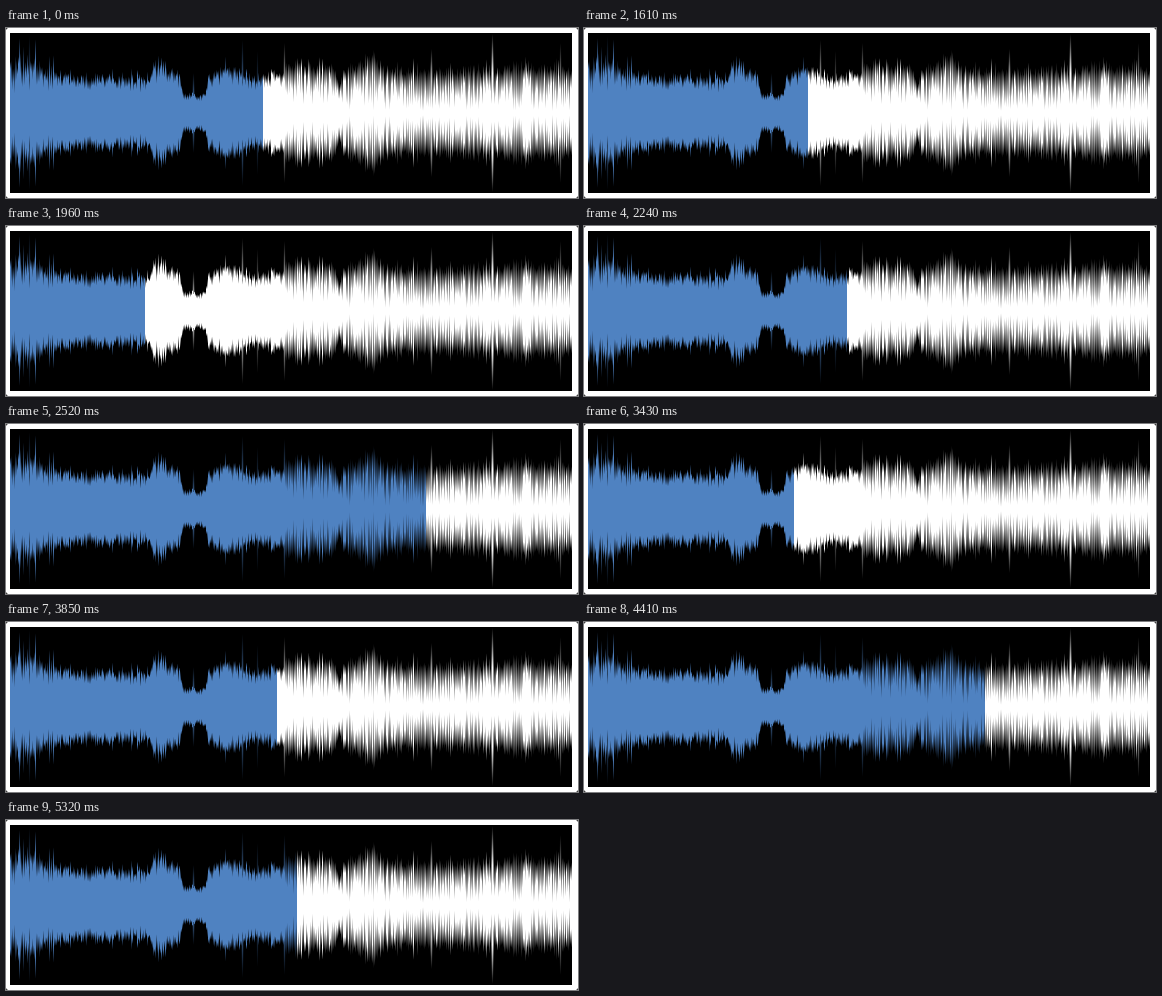
A matplotlib script that plays this animation: 572x170 px, repeating every 5.46 s.

```python
import numpy as np
import matplotlib.pyplot as plt
from matplotlib.animation import FuncAnimation

W, H, DPI = 572, 170, 100
LEFT, RIGHT, TOP, BOTTOM = 4, 566, 5, 165
MID = 85
FRAMES, INTERVAL = 78, 70
BLUE = np.array([0.31, 0.51, 0.76])

# Loudness: x, half height
LOUDNESS = [(4, 50), (30, 48), (58, 36), (143, 36), (147, 51), (172, 42),
            (178, 19), (199, 19), (202, 37), (225, 47), (238, 37),
            (276, 37), (280, 50), (329, 46), (333, 28), (337, 41),
            (368, 57), (378, 43), (480, 43), (515, 49), (565, 43)]

# Single peaks: x, half height, brightness
PEAKS = [(23, 77, 0.5), (187, 40, 0.6), (236, 73, 0.6), (251, 62, 0.35),
         (278, 70, 0.6), (425, 64, 0.8), (486, 79, 1.0), (554, 70, 0.5)]

# Playhead: frame, x; eased between the points
PATH = [(22, 257), (24, 190), (25, 190), (27.5, 137), (37.5, 436),
        (38.3, 436), (49.8, 207), (63.2, 401), (68, 291)]


def build_wave():
    """Brightness of the sound wave, one value per pixel."""
    rng = np.random.default_rng(12)
    xs = np.arange(LEFT, RIGHT)
    dist = np.abs(np.arange(TOP, BOTTOM) + 0.5 - MID)[:, None]

    # The opening is spiky, the middle dense, the rest streaky.
    soft = np.interp(xs, [4, 60, 276, 282, 330, 340],
                     [0.5, 0.28, 0.28, 0.68, 0.68, 0.8])
    burst = np.interp(xs, [4, 45, 60], [0.55, 0.45, 0.25])

    reach = np.interp(xs, *zip(*LOUDNESS))
    reach *= rng.uniform(0.85, 1.05, xs.size)
    reach *= 1 + burst * rng.random(xs.size) ** 5
    fade = soft * rng.uniform(0.25, 1.2, xs.size)
    wave = np.clip((1 - dist / reach) / fade, 0, 1)

    for x, height, gain in PEAKS:
        width = 1 + gain * (1 - dist / height)
        slope = np.clip(width - np.abs(xs - x), 0, 1)
        peak = gain * slope * np.clip(2 * (1 - dist / height), 0, 1)
        wave = np.maximum(wave, peak)
    return wave


def build_stage():
    """White card with slightly rounded corners."""
    stage = np.ones((H, W, 3))
    for y, dy in ((0, 1), (H - 1, -1)):
        for x, dx in ((0, 1), (W - 1, -1)):
            stage[y, x] = 0.25
            stage[y + dy, x] = stage[y, x + dx] = 0.7
    return stage


def playhead(frame):
    if frame <= PATH[0][0]:
        return PATH[0][1]
    for (f0, x0), (f1, x1) in zip(PATH, PATH[1:]):
        if frame <= f1:
            ease = (1 - np.cos(np.pi * (frame - f0) / (f1 - f0))) / 2
            return round(x0 + (x1 - x0) * ease)
    return PATH[-1][1]


wave = build_wave()
stage = build_stage()
columns = np.arange(LEFT, RIGHT)

fig = plt.figure(figsize=(W / DPI, H / DPI), dpi=DPI)
ax = fig.add_axes([0, 0, 1, 1])
ax.axis("off")
picture = ax.imshow(stage, extent=(0, W, H, 0), aspect="auto",
                    interpolation="nearest")


def update(frame):
    played = columns < playhead(frame)
    tint = np.where(played[:, None], BLUE, 1.0)
    stage[TOP:BOTTOM, LEFT:RIGHT] = wave[..., None] * tint
    picture.set_data(stage)
    return (picture,)


anim = FuncAnimation(fig, update, frames=FRAMES, interval=INTERVAL,
                     repeat=True)
plt.show()
```
